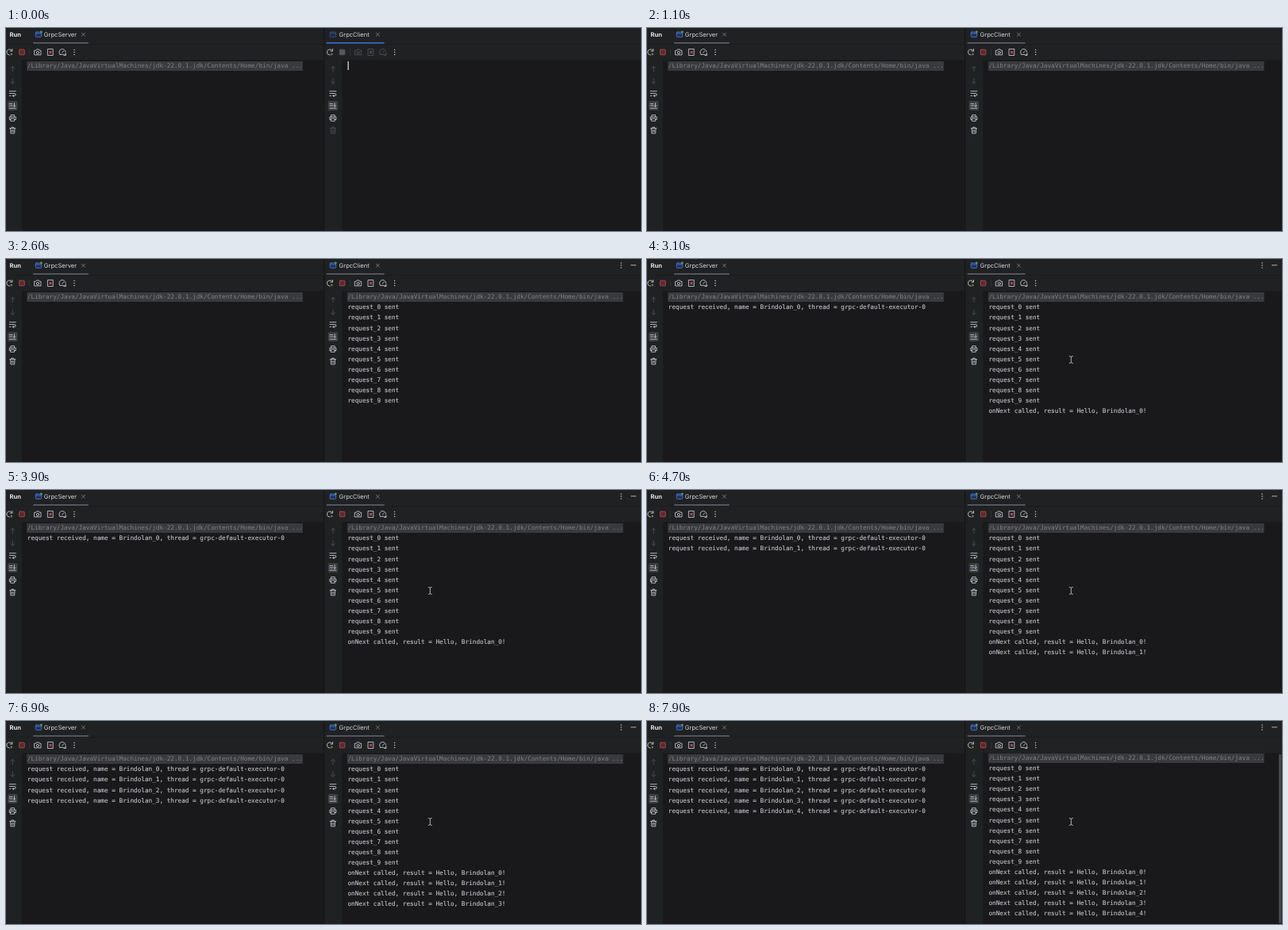
An HTML page that plays this animation: 800x256 px, repeating every 8000 ms.

```html
<!DOCTYPE html>
<html lang="en">
<head>
<meta charset="utf-8">
<title>gRPC run consoles</title>
<style>
  html, body { margin: 0; width: 100%; height: 100%; overflow: hidden; background: #19191b; }
  svg { display: block; }
  text { text-rendering: geometricPrecision; white-space: pre; }
  .ui { font: 7.6px Inter, Roboto, sans-serif; fill: #d3d5da; }
  .bold { font-weight: 700; fill: #e6e7ea; }
  .log { font: 7.7px "DejaVu Sans Mono", "Noto Sans Mono", monospace; fill: #c0c2c7; stroke: #c0c2c7; stroke-width: .12; }
  .command { fill: #7f8186; stroke: none; }
  .icon { fill: none; stroke: #c0c2c7; stroke-width: .9; stroke-linecap: round; stroke-linejoin: round; }
  .icon .dot { fill: #c0c2c7; stroke: none; }
  .icon .green { stroke: none; fill: #57965c; }
  .icon .red { stroke: #b04a4d; fill: #5c2a2d; }
  .icon .alert { stroke: #e0555a; stroke-width: 1.2; }
  .dim, .off .live { stroke: #4b4d52; }
  .off .live .red { stroke: #55575b; fill: #55575b; }
  .off .live .alert { stroke: #55575b; }
  .off .tab { opacity: .55; }
  .off .tab .green { display: none; }
  .underline { fill: #5a5d63; }
  .off .underline { fill: #3568c8; }
</style>
</head>
<body>
<svg id="stage" width="800" height="256" viewBox="0 0 800 256">
  <defs>
    <clipPath id="console"><rect x="20" y="40.5" width="376" height="215.5"/></clipPath>
  </defs>
</svg>
<script>
const LOOP = 8000;
const LINE = 13.04;
const COMMAND = "/Library/Java/JavaVirtualMachines/jdk-22.0.1.jdk/Contents/Home/bin/java ...";
const USER = "Brindolan";

const START = 1000;      // client process launches
const SENT = 1700;       // all requests leave at once
const HOVER = 1900;      // window controls appear
const POINTER = 2900;
const FIRST_REPLY = 3000;
const REPLY_GAP = 1000;
const OVERFLOW = FIRST_REPLY + 4 * REPLY_GAP;

const stage = document.getElementById("stage");

function add(parent, tag, attrs = {}, content = "") {
  const node = document.createElementNS("http://www.w3.org/2000/svg", tag);
  for (const key in attrs) node.setAttribute(key, attrs[key]);
  node.innerHTML = content;
  parent.append(node);
  return node;
}

const rect = (parent, x, y, width, height, fill, rx = 0) =>
  add(parent, "rect", { x, y, width, height, fill, rx });

const label = (parent, x, y, content, style) =>
  add(parent, "text", { x, y, class: style }, content);

const path = (d, style = "") => `<path class="${style}" d="${d}"/>`;
const dots = (...points) =>
  points.map(([x, y]) => `<circle class="dot" cx="${x}" cy="${y}" r=".8"/>`).join("");

// Each icon is drawn around its own centre.
const ICONS = {
  tab: '<g stroke="#3f73dc"><rect x="-3.7" y="-3.2" width="7.4" height="6.4" rx="1" fill="#25324d"/>' +
    '<path d="M-3.7-1.4H3.7"/></g><circle class="green" cx="3.4" cy="-3.2" r="1.4"/>',
  close: path("M-2-2L2 2M2-2L-2 2"),
  rerun: path("M3.2-1.6A3.6 3.6 0 1 0 0 3.6M3.4-4V-1.4H.8") +
    path("M1.4 .8L4.2 2.5L1.4 4.2Z", "green"),
  stop: '<rect class="red" x="-3.3" y="-3.3" width="6.6" height="6.6" rx=".8"/>',
  camera: path("M-4-2.2H-2.2L-1.4-3.6H1.4L2.2-2.2H4V3.4H-4Z") + '<circle cy=".5" r="1.6"/>',
  dump: path("M-3.2-4H3.2V4H-3.2Z") + path("M-1.1-1.1L1.1 1.1M1.1-1.1L-1.1 1.1", "alert"),
  gauge: path("M-3 2.9A4.1 4.1 0 1 1 4.1 0M-.4 .6L1.8-1.4M-3 2.9H1.4") + path("M2.2 4H4.4V1.8Z"),
  more: dots([0, -3], [0, 0], [0, 3]),
  up: path("M0 3.2V-3.2M-2.6-.8L0-3.2L2.6-.8"),
  down: path("M0-3.2V3.2M-2.6.8L0 3.2L2.6.8"),
  wrap: path("M-4-2.8H4M-4 0H2.4A1.5 1.5 0 0 1 2.4 3H0M1.4 1.6L0 3L1.4 4.4M-4 3H-2.4"),
  end: path("M-4-2.4H-.4M-4 0H-.4M-4 3.2H4M2.2-3.4V1.2M.7-.3L2.2 1.2L3.7-.3"),
  print: path("M-2.3-1.4V-3.8H2.3V-1.4M-2.3 2H-4V-1.4H4V2H2.3M-2.3.6H2.3V3.8H-2.3Z"),
  trash: path("M-3.6-2.6H3.6M-1.3-2.6V-3.9H1.3V-2.6M-2.8-2.6L-2.4 3.9H2.4L2.8-2.6M-.9-.6V2M.9-.6V2"),
  minus: path("M-3 0H3"),
};

const icon = (parent, name, x, y, style = "") =>
  add(parent, "g", { class: `icon ${style}`, transform: `translate(${x} ${y})` }, ICONS[name]);

function addTab(pane, x, name, textX, lineX, lineWidth) {
  add(pane, "rect", { class: "underline", x: lineX, y: 18, width: lineWidth, height: 1.8, rx: .9 });
  icon(pane, "tab", x, 8.2, "tab");
  label(pane, textX, 10.8, name, "ui");
  icon(pane, "close", x + 56.5, 8.2, "dim").style.stroke = "#7b7d82";
}

function addPane(x) {
  const pane = add(stage, "g", { transform: `translate(${x} 0)` });
  rect(pane, 0, 0, 400, 40.5, "#202123");
  rect(pane, 0, 40, 20, 216, "#202123");
  rect(pane, 0, 20, 400, .6, "#19191b");

  icon(pane, "rerun", 4.5, 30.5);
  icon(pane, "stop", 20, 30.5, "live");
  rect(pane, 29.5, 26, .6, 9, "#3a3c40");
  icon(pane, "camera", 40, 30.5, "live");
  icon(pane, "dump", 56, 30.5, "live");
  icon(pane, "gauge", 71, 30.5, "live");
  icon(pane, "more", 86, 30.5);

  rect(pane, 2, 92, 12.6, 12, "#3b3d41", 2);
  ["up", "down", "wrap", "end", "print", "trash"].forEach((name, i) =>
    icon(pane, name, 8.3, 51.5 + i * 15.5, i < 2 ? "dim" : i === 5 ? "live" : ""));

  const clip = add(pane, "g", { "clip-path": "url(#console)" });
  const log = add(clip, "g");
  const command = add(log, "g");
  rect(command, 26.3, 42, 347.6, 12, "#393a3d");
  label(command, 26.8, 50.4, COMMAND, "log command");
  return { pane, log, command };
}

const logLine = (target, row, content) =>
  label(target.log, 26.8, 50.4 + row * LINE, content, "log");

const show = (node, visible) => node.setAttribute("visibility", visible ? "visible" : "hidden");

const server = addPane(0);
const client = addPane(403.6);
rect(stage, 400, 0, 1.2, 256, "#151517");
rect(stage, 401.2, 0, 2.6, 256, "#202123");
addTab(server.pane, 41, "GrpcServer", 47.8, 34, 70);
addTab(client.pane, 8.3, "GrpcClient", 15.9, -2.4, 75.6);
label(stage, 4.6, 10.8, "Run", "ui bold");

const requests = Array.from({ length: 10 }, (_, i) => logLine(client, i + 1, `request_${i} sent`));
const replies = Array.from({ length: 5 }, (_, i) => [
  logLine(server, i + 1, `request received, name = ${USER}_${i}, thread = grpc-default-executor-0`),
  logLine(client, i + 11, `onNext called, result = Hello, ${USER}_${i}!`),
]);

const controls = add(stage, "g");
icon(controls, "more", 775, 8);
icon(controls, "minus", 790.5, 7.8);
const scrollbar = rect(stage, 796, 42, 3.4, 213, "#46474a");
const caret = rect(stage, 430.5, 42, 1.3, 11, "#d4d6da");
const pointer = add(stage, "g", { class: "icon", transform: "translate(534.3 127)" },
  path("M-2-4.4Q0-4.4 0-3.4Q0-4.4 2-4.4M0-3.4V3.4M-2 4.4Q0 4.4 0 3.4Q0 4.4 2 4.4"));

function render(time) {
  const running = time >= START;
  client.pane.classList.toggle("off", !running);
  show(client.command, running);
  show(caret, time < 500);
  requests.forEach(line => show(line, time >= SENT));
  replies.forEach((pair, i) =>
    pair.forEach(line => show(line, time >= FIRST_REPLY + i * REPLY_GAP)));
  show(controls, time >= HOVER);
  show(pointer, time >= POINTER);

  const scrolled = time >= OVERFLOW;
  show(scrollbar, scrolled);
  client.log.setAttribute("transform", `translate(0 ${scrolled ? -1.1 : 0})`);
}

const origin = performance.now();
function tick() {
  render((performance.now() - origin) % LOOP);
  requestAnimationFrame(tick);
}
tick();
</script>
</body>
</html>
```
